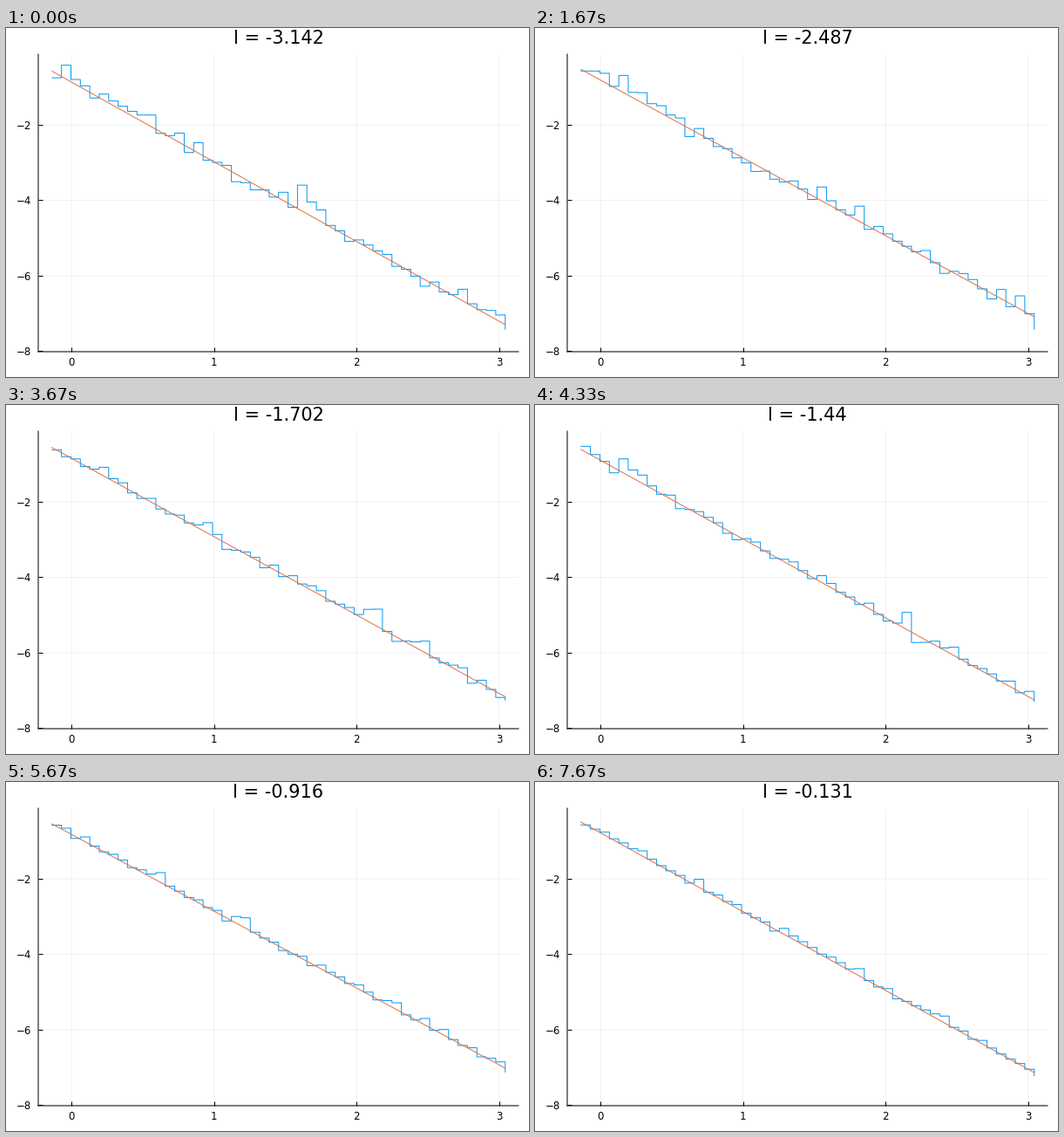
Write a matplotlib script that moves like this. It is 600 px wide and 400 px high and loops after 8000 ms.

```python
import numpy as np
import matplotlib.pyplot as plt
from matplotlib.animation import FuncAnimation

W, H, DPI = 600, 400, 100
STAGES, LOOP_MS, TICK_MS = 24, 8000, 50
BINS = 48
PX = 72 / DPI                      # one pixel in points
X0, X_UNIT = 75.3, 163.45          # pixel of x = 0, pixels per unit
Y0, Y_UNIT = 24.7, 43.2            # pixel of y = 0, pixels per unit downwards
LEFT, RIGHT, TOP, BOTTOM = 37, 588, 30, 371

plt.rcParams["font.family"] = "DejaVu Sans"

# Both ends of the fitted line drift through a few key heights, in pixels.
KEYS = [0, 5, 8, 13, 17, 20, 23]
STARTS = [49.5, 47.5, 45.5, 51, 48, 50.5, 46]
ENDS = [340, 331, 329, 338, 328, 333, 333]


def to_x(px):
    return (px - X0) / X_UNIT


def to_y(px):
    return (Y0 - px) / Y_UNIT


def spectrum(k):
    """Step heights and fitted line in pixels; the noise calms down with k."""
    rng = np.random.default_rng(100 + k)
    line = np.linspace(np.interp(k, KEYS, STARTS), np.interp(k, KEYS, ENDS), BINS + 1)
    spread = 7.5 - 0.22 * k
    above = rng.normal(-1.5, 0.7 * spread, BINS + 1)
    peaks = rng.choice(BINS, 5, replace=False)
    above[peaks] += rng.uniform(1, 3.2, 5) * spread
    above[-1] = -rng.exponential(1.5 * spread)
    return np.minimum(line - above, BOTTOM), line


fig = plt.figure(figsize=(W / DPI, H / DPI), dpi=DPI, facecolor="white")
ax = fig.add_axes([LEFT / W, 1 - BOTTOM / H, (RIGHT - LEFT) / W, (BOTTOM - TOP) / H])
ax.set_xlim(to_x(LEFT), to_x(RIGHT))
ax.set_ylim(to_y(BOTTOM), to_y(TOP))
ax.set_xticks(range(4))
ax.set_yticks(range(-8, 0, 2))
ax.spines[["top", "right"]].set_visible(False)
ax.spines[["left", "bottom"]].set(linewidth=PX, snap=False)
ax.tick_params(direction="in", length=5 * PX, width=PX, labelsize=8.5)
ax.tick_params(axis="x", pad=6 * PX)
ax.tick_params(axis="y", pad=8 * PX)
ax.grid(color="black", alpha=0.06, linewidth=PX, snap=False)
ax.set_axisbelow(True)

x = to_x(np.linspace(52.8, 572.7, BINS + 1))
step_line, = ax.plot(x, x, color="#009af9", lw=PX, drawstyle="steps-post", snap=False)
fit_line, = ax.plot(x, x, color="#e26f46", lw=PX)
title = fig.text(312.5 / W, 1 - 18.3 / H, "", fontsize=15, ha="center", va="baseline")


def update(tick):
    # Each stage starts on the tick that covers its first moment.
    k = int((tick * TICK_MS + 35) * STAGES / LOOP_MS) % STAGES
    steps, line = spectrum(k)
    step_line.set_ydata(to_y(steps))
    fit_line.set_ydata(to_y(line))
    title.set_text(f"l = {round(-np.pi + k * np.pi / STAGES, 3)}")
    return step_line, fit_line, title


anim = FuncAnimation(fig, update, frames=LOOP_MS // TICK_MS, interval=TICK_MS,
                     repeat=True, repeat_delay=0)
plt.show()
```
